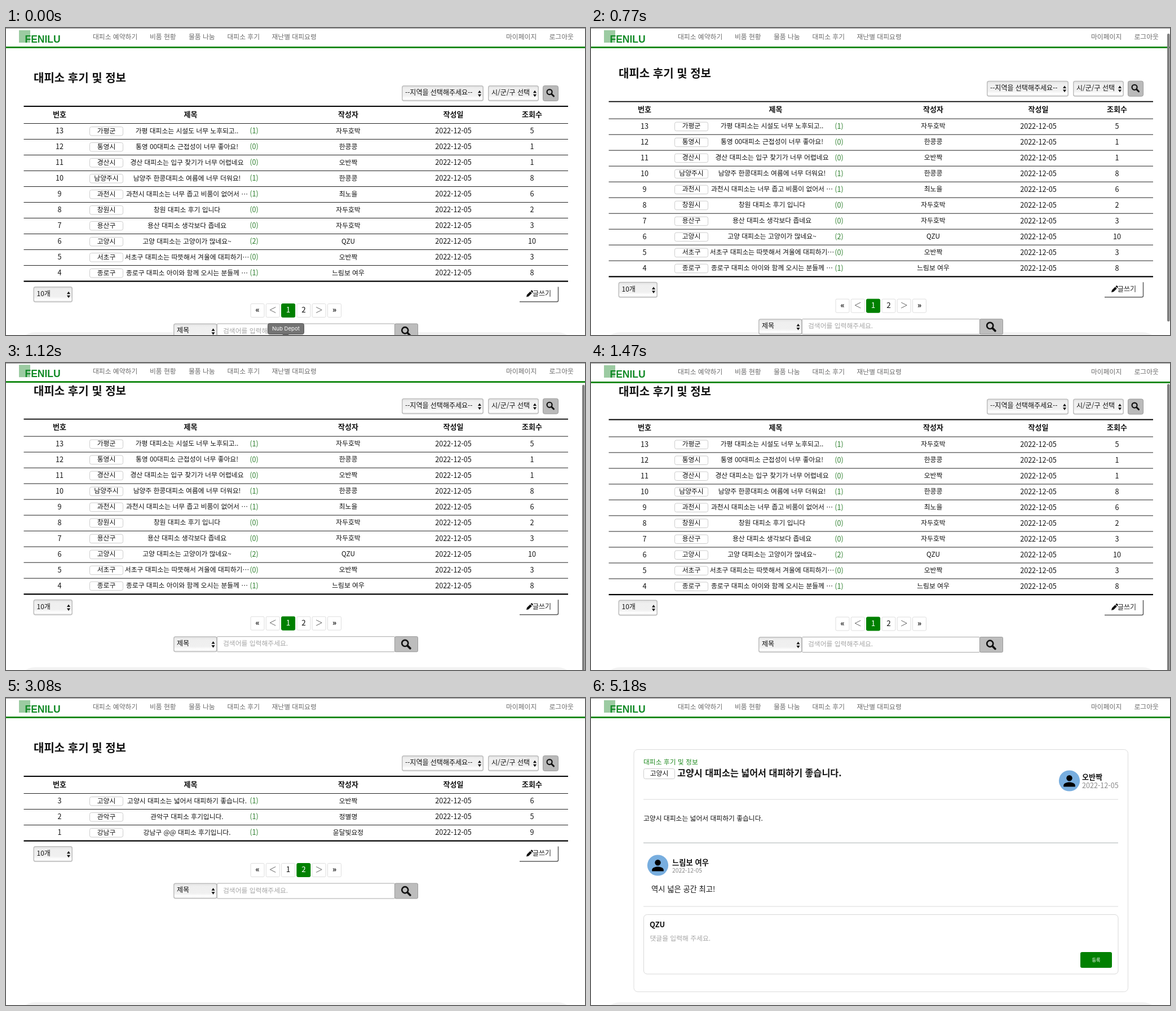
An HTML page for the animation above (7560 ms loop, 1027 by 545 pixels).

```html
<!DOCTYPE html>
<html lang="ko">
<head>
<meta charset="utf-8">
<title>대피소 후기 및 정보</title>
<style>
  html, body { margin: 0; width: 100%; height: 100%; overflow: hidden; background: #fff; }
  svg { display: block; width: 100vw; height: 100vh; }
  text { font-family: 'Noto Sans CJK KR', 'Noto Sans CJK', 'Noto Sans', sans-serif; white-space: pre; }
</style>
</head>
<body>
<svg id="stage" viewBox="0 0 1027 545">
  <defs>
    <linearGradient id="field" x1="0" y1="0" x2="0" y2="1">
      <stop offset="0" stop-color="#e2e2e2"/>
      <stop offset=".2" stop-color="#efefef"/>
      <stop offset=".65" stop-color="#f0f0f0"/>
      <stop offset=".85" stop-color="#fff"/>
      <stop offset="1" stop-color="#e6e6e6"/>
    </linearGradient>
  </defs>
</svg>
<script>
const LOOP = 7560, GREEN = '#008000', MAX_SCROLL = 38.5;
const stage = document.getElementById('stage');

function el(parent, tag, attrs = {}, content) {
  const node = document.createElementNS('http://www.w3.org/2000/svg', tag);
  for (const key in attrs) node.setAttribute(key, attrs[key]);
  if (content !== undefined) node.textContent = content;
  return parent.appendChild(node);
}
const group = parent => el(parent, 'g');
const show = (node, on) => node.setAttribute('visibility', on ? 'inherit' : 'hidden');
const move = (node, y) => node.setAttribute('transform', `translate(0 ${y})`);
const path = (g, d, attrs) => el(g, 'path', { d, fill: 'none', ...attrs });

// Text placed by its vertical centre
function label(g, x, cy, content, { size = 11.8, fill = '#111', bold, mid } = {}) {
  return el(g, 'text', {
    x, y: cy + size * 0.36, fill, 'font-size': size,
    'font-weight': bold ? 700 : 400, 'text-anchor': mid ? 'middle' : 'start'
  }, content);
}
function box(g, x, y, width, height, fill = '#fff', stroke = 'none', rx = 3) {
  return el(g, 'rect', { x, y, width, height, rx, fill, stroke });
}
function rule(g, y, x1, x2, stroke, width = 1) {
  el(g, 'line', { x1, x2, y1: y, y2: y, stroke, 'stroke-width': width });
}
function select(g, x, y, width, content) {
  box(g, x + .75, y + .75, width - 1.5, 26.5, 'url(#field)', '#bdbdbd').setAttribute('stroke-width', 1.5);
  label(g, x + 6, y + 12.5, content, { size: 12 });
  const a = x + width - 7, b = y + 14.5;
  path(g, `M${a - 3} ${b - 1.2}l3 -4.6l3 4.6zM${a - 3} ${b + 1.2}l3 4.6l3 -4.6z`, { fill: '#111' });
}
function magnifier(g, x, y, k) {
  el(g, 'circle', { cx: x - 1.3 * k, cy: y - 1.3 * k, r: 4.1 * k, fill: 'none', stroke: '#111', 'stroke-width': 2 * k });
  path(g, `M${x + 2 * k} ${y + 2 * k}L${x + 5.5 * k} ${y + 5.5 * k}`, { stroke: '#111', 'stroke-width': 2.7 * k, 'stroke-linecap': 'round' });
}
function avatar(g, x, y) {
  el(g, 'circle', { cx: x, cy: y, r: 18.6, fill: '#78aedf' });
  el(g, 'circle', { cx: x, cy: y - 4.8, r: 5.2, fill: '#000' });
  path(g, `M${x - 10.3} ${y + 10.5}v-2.6c0 -3.6 6.8 -5.4 10.3 -5.4s10.3 1.8 10.3 5.4v2.6z`, { fill: '#000' });
}

function buildList(rows, current) {
  const g = group(stage), titles = [];
  label(g, 49, 89, '대피소 후기 및 정보', { size: 20, bold: true });
  select(g, 702, 102, 145, '--지역을 선택해주세요--');
  select(g, 855, 102, 90, '시/군/구 선택');
  box(g, 952.5, 102.5, 27, 27, '#bababa', '#9a9a9a');
  magnifier(g, 965.5, 115, 1.1);

  rule(g, 139, 31.5, 997, '#000', 1.8);
  [[95, '번호'], [327.5, '제목'], [607, '작성자'], [793.5, '작성일'], [933, '조회수']]
    .forEach(([x, name]) => label(g, x, 153, name, { size: 13, bold: true, mid: true }));

  rows.forEach(([no, area, title, replies, author, views], i) => {
    const y = 182.5 + 28 * i, mid = true, digits = { size: 12.6, mid };
    rule(g, y - 13, 31.5, 997, '#222');
    label(g, 95, y, no, digits);
    box(g, 148.5, y - 7, 59, 15.5, '#fff', '#ccc');
    label(g, 178, y, area, { mid });
    titles.push(label(g, 321, y, title, { mid }));
    label(g, 440, y, `(${replies})`, { ...digits, fill: '#2f802f' });
    label(g, 607, y, author, { mid });
    label(g, 793.5, y, '2022-12-05', digits);
    label(g, 933, y, views, digits);
  });

  const end = 169.5 + 28 * rows.length;
  rule(g, end + .2, 31.5, 997, '#000', 2.2);
  select(g, 48.5, end + 9.5, 69.5, '10개');
  path(g, `M911 ${end + 36.5}h66q2.5 0 2.5 -2.5v-24`, { stroke: '#5c5c5c', 'stroke-width': 1.5 });
  const py = end + 22.5;
  path(g, `M923 ${py + 5.5}l1 -4l5.8 -5.8l3 3l-5.8 5.8zM930.5 ${py - 5}l1.2 -1.2q.8 -.6 1.5 0l1.4 1.4q.7 .7 0 1.5l-1.1 1.2z`, { fill: '#111' });
  label(g, 934, py, '글쓰기', { size: 12, fill: '#222' });

  const buttons = ['«', '<', 1, 2, '>', '»'].map((sign, i) => {
    const x = 434 + 27.3 * i, y = end + 40, on = sign === current;
    const b = box(g, x, y, 24, 24, on ? GREEN : '#fff', on ? GREEN : '#dedede', 2);
    const cx = x + 12, cy = y + 11;
    if (sign === '<' || sign === '>') {
      const d = sign === '<' ? 1 : -1;
      path(g, `M${cx + 5 * d} ${cy - 5}l${-10 * d} 5l${10 * d} 5`, { stroke: '#666' });
    } else {
      label(g, cx, cy, sign, { size: 13.5, mid: true, fill: on ? '#fff' : '#111', bold: typeof sign === 'string' });
    }
    return b;
  });

  const sy = end + 75;
  box(g, 374.5, sy + .5, 315, 27, '#fff', '#a8a8a8', 1);
  select(g, 297, sy, 77.5, '제목');
  label(g, 385, sy + 13, '검색어를 입력해주세요.', { fill: '#a6a6a6' });
  box(g, 689.5, sy + .5, 41, 27, '#bdbdbd', '#999', 2);
  magnifier(g, 709.5, sy + 14, 1.35);
  return { g, titles, buttons };
}

function buildPost() {
  const g = group(stage), title = '고양시 대피소는 넓어서 대피하기 좋습니다.';
  box(g, 76, 91.5, 876.5, 430, '#fff', '#dcdcdc', 7);
  label(g, 93, 114, '대피소 후기 및 정보', { fill: '#1f8a1f' });
  box(g, 93.5, 125.5, 55, 18, '#fff', '#ccc');
  label(g, 121, 133.5, '고양시', { mid: true });
  label(g, 153, 133, title, { size: 16.2, bold: true });
  avatar(g, 848.5, 147);
  label(g, 871, 140.5, '오반짝', { size: 13, bold: true });
  label(g, 871, 155.5, '2022-12-05', { size: 12.6, fill: '#888' });
  rule(g, 180, 93, 935, '#dadada');
  label(g, 93, 213.5, title);
  rule(g, 257.2, 93, 935, '#c6cacb', 1.4);
  avatar(g, 118.5, 297);
  label(g, 144, 292, '느림보 여우', { size: 13.3, bold: true });
  label(g, 144, 306.3, '2022-12-05', { size: 10.3, fill: '#888' });
  label(g, 107, 339.5, '역시 넓은 공간 최고!', { size: 13.3 });
  rule(g, 370, 93, 935, '#dadada');
  box(g, 93.5, 384.5, 841.5, 105.5, '#fff', '#d8d8d8', 6);
  label(g, 104, 402, 'QZU', { size: 13, bold: true });
  label(g, 104.5, 426.5, '댓글을 입력해 주세요.', { fill: '#a6a6a6' });
  box(g, 868, 451, 56, 28, GREEN);
  label(g, 896, 465, '등록', { size: 8.2, fill: '#fff', mid: true });
  return g;
}

function buildHeader() {
  const g = group(stage);
  box(g, 0, -5, 1027, 38, '#fff', 'none', 0);
  box(g, 0, 33, 1027, 2.8, '#0a840a', 'none', 0);
  box(g, 23, 4, 20, 22, '#9ccba2', 'none', 0);
  el(g, 'text', {
    x: 33.5, y: 26, fill: '#118a26', 'font-size': 17.5, 'font-weight': 700,
    style: "font-family:'Liberation Sans',sans-serif"
  }, 'FENILU');
  [[154, '대피소 예약하기'], [255, '비품 현황'], [324, '물품 나눔'], [392.5, '대피소 후기'],
   [471.5, '재난별 대피요령'], [887, '마이페이지'], [963.5, '로그아웃']]
    .forEach(([x, name]) => label(g, x, 15.5, name, { fill: '#6c6c6c' }));
  return g;
}

function buildTip() {
  const g = group(stage);
  path(g, 'M489 543l7 6l7 -6z', { fill: '#6e6e6e' });
  box(g, 464.5, 524.5, 64, 19, '#747474', '#555');
  el(g, 'text', {
    x: 496.5, y: 537.3, fill: '#fff', 'font-size': 9.6, 'text-anchor': 'middle',
    style: 'font-family:Inter,sans-serif'
  }, 'Nub Depot');
  return g;
}

box(stage, 20, 540, 990, 80, '#f3f3f3', 'none', 32);
const first = buildList([
  [13, '가평군', '가평 대피소는 시설도 너무 노후되고..', 1, '자두호박', 5],
  [12, '통영시', '통영 00대피소 근접성이 너무 좋아요!', 0, '한콩콩', 1],
  [11, '경산시', '경산 대피소는 입구 찾기가 너무 어렵네요', 0, '오반짝', 1],
  [10, '남양주시', '남양주 한콩대피소 여름에 너무 더워요!', 1, '한콩콩', 8],
  [9, '과천시', '과천시 대피소는 너무 좁고 비품이 없어서 ⋯', 1, '최노을', 6],
  [8, '창원시', '창원 대피소 후기 입니다', 0, '자두호박', 2],
  [7, '용산구', '용산 대피소 생각보다 좁네요', 0, '자두호박', 3],
  [6, '고양시', '고양 대피소는 고양이가 많네요~', 2, 'QZU', 10],
  [5, '서초구', '서초구 대피소는 따뜻해서 겨울에 대피하기⋯', 0, '오반짝', 3],
  [4, '종로구', '종로구 대피소 아이와 함께 오시는 분들께 ⋯', 1, '느림보 여우', 8]
], 1);
const second = buildList([
  [3, '고양시', '고양시 대피소는 넓어서 대피하기 좋습니다.', 1, '오반짝', 6],
  [2, '관악구', '관악구 대피소 후기입니다.', 1, '정별명', 5],
  [1, '강남구', '강남구 @@ 대피소 후기입니다.', 1, '윤달빛요정', 9]
], 2);
const post = buildPost();
const header = buildHeader();
box(stage, 0, 0, 1027, 1, '#8a8a8a', 'none', 0);
const bar = box(stage, 1022, 0, 4.5, 511, '#7f7f7f', 'none', 2);
const tip = buildTip();

// Value of the last [time, value] step reached
const step = (steps, t) => steps.reduce((v, [at, next]) => t >= at ? next : v, 0);
const between = (t, a, b) => t >= a && t < b;

const scrollSteps = [[770, 8.3], [840, 26], [910, 40.5], [980, 41.5], [1050, 40.5], [1120, 39.3], [1260, MAX_SCROLL]];
const barSteps = [[770, 1], [2100, .7], [2170, .35], [2240, 0]];
const tipSteps = [[0, 1], [70, .75], [140, .5], [210, .25], [280, 0]];
const hovers = [[4830, 5110], [4550, 4620], [4060, 4200]];

function draw(t) {
  const scroll = step(scrollSteps, t);
  show(first.g, t < 3080);
  show(second.g, between(t, 3080, 5110));
  show(post, t >= 5110);
  move(first.g, -scroll);
  move(header, t < 3080 ? Math.min(0, MAX_SCROLL - scroll) : 0);

  bar.setAttribute('y', 2.2 + scroll * .93 - (t >= 1470 ? .8 : 0));
  bar.setAttribute('opacity', step(barSteps, t));
  tip.setAttribute('opacity', step(tipSteps, t));

  first.buttons[3].setAttribute('fill', t >= 2380 ? '#f8f8f8' : '#fff');
  second.buttons[0].setAttribute('fill', between(t, 3920, 3990) ? '#f8f8f8' : '#fff');
  second.titles.forEach((title, i) =>
    title.setAttribute('text-decoration', between(t, ...hovers[i]) ? 'underline' : 'none'));
}

const start = performance.now();
(function tick() {
  draw((performance.now() - start) % LOOP);
  requestAnimationFrame(tick);
})();
</script>
</body>
</html>
```
